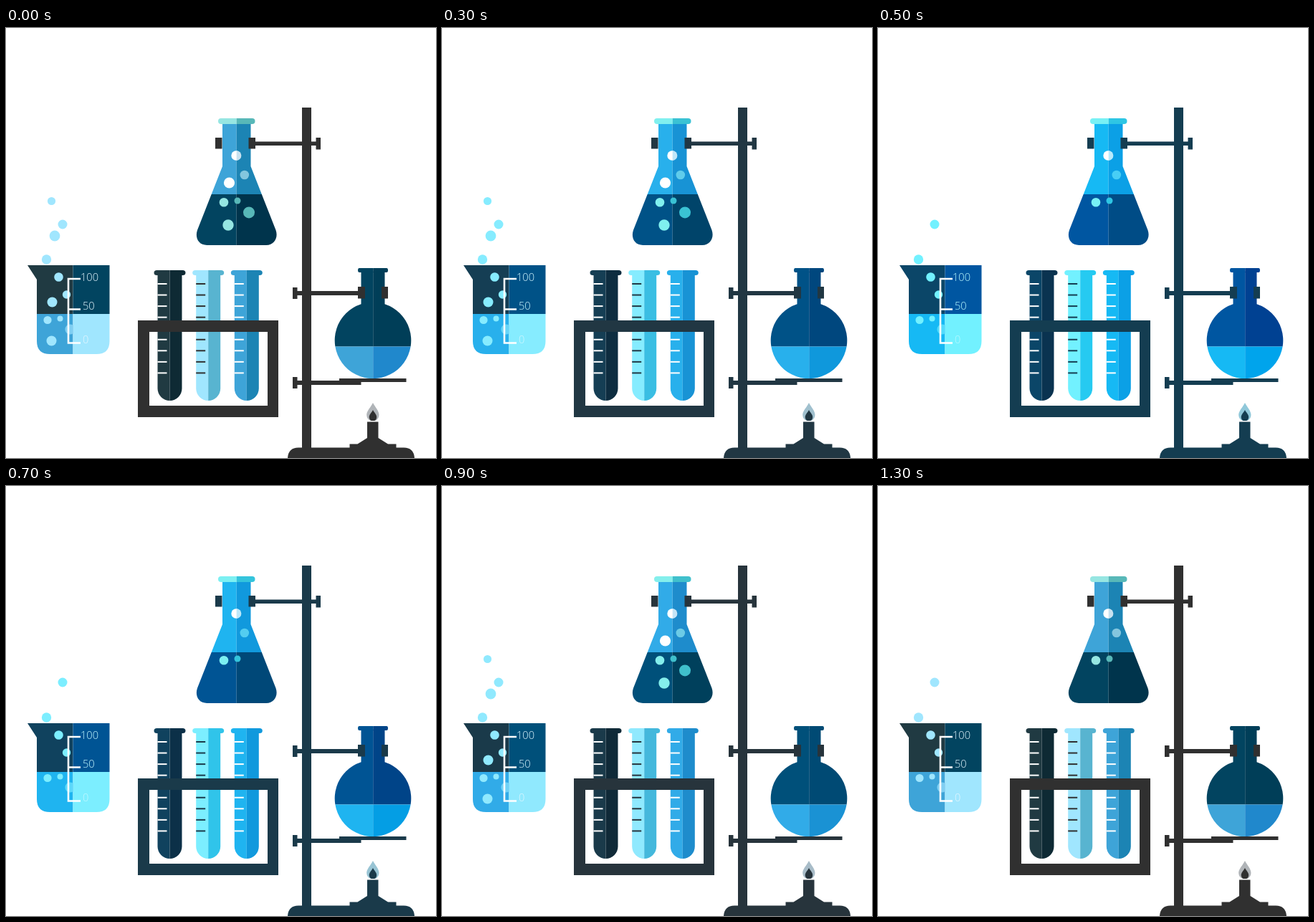
Recreate the animation shown at these times as an HTML page. Size 600x600 px, loop 1.7 s.

```html
<!DOCTYPE html>
<html lang="en">
<head>
<meta charset="utf-8">
<title>Chemistry set</title>
<style>
html, body { margin: 0; width: 100%; height: 100%; overflow: hidden; background: #fff; }
svg { display: block; width: 100vw; height: 100vh; }
text { font: 300 14.6px "Open Sans", "Noto Sans", sans-serif; }
</style>
</head>
<body>
<svg id="stage" viewBox="0 0 600 600"></svg>
<script>
// Each colour at rest, halfway and vivid
const tones = {
  iron: ['#303030', '#27343c', '#1a3a4a'],
  sky: ['#3ea4d8', '#31abe8', '#1fb4f0'],
  skyShade: ['#1c84b4', '#1e8ccc', '#1199dd'],
  azure: ['#2088cc', '#1a92d4', '#049ee4'],
  deep: ['#024460', '#00507a', '#005494'],
  deepShade: ['#00344c', '#00405c', '#004878'],
  navy: ['#003e58', '#004a74', '#004488'],
  slate: ['#203a42', '#1a3a4a', '#10425e'],
  slateShade: ['#0e2a34', '#102a38', '#0c3048'],
  ice: ['#a0e6fe', '#90e9fe', '#7ceeff'],
  iceShade: ['#58b4d0', '#44b8dc', '#30c4ea'],
  mint: ['#96e6e2', '#84efec', '#7cf0f2'],
  mintShade: ['#58b8b8', '#40c0cc', '#34c4dc'],
  haze: ['#84c6de', '#6ccbe6', '#54cdf0'],
  mist: ['#c8e2f0', '#c4e4f6', '#bce8fa'],
  drop: ['#80cff2', '#70d2f6', '#5cd8fa'],
  label: ['#e4f6fe', '#dcf6fe', '#c4f8ff'],
  flame: ['#b0b4b8', '#a8bcc8', '#98c4d4']
};

const fill = c => `style="fill:${c[0] === '#' ? c : `var(--${c})`}"`;
const rect = (x, y, x2, y2, c, r = 0) =>
  `<rect x="${x}" y="${y}" width="${x2 - x}" height="${y2 - y}" rx="${r}" ${fill(c)}/>`;
const path = (d, c) => `<path d="${d}" ${fill(c)}/>`;
const dot = (x, y, r, c, blink) =>
  `<circle cx="${x}" cy="${y}" r="${r}" ${fill(c)}${blink ? ' class="blink"' : ''}/>`;
const label = (x, y, s) => `<text x="${x}" y="${y}" ${fill('label')}>${s}</text>`;

// Vessel outline filled by bands, each split into a left and a right tone
let clips = 0;
function vessel(d, mid, bands) {
  const id = 'v' + clips++;
  const body = bands.map(([y, y2, left, right]) =>
    rect(0, y, mid, y2, left) + rect(mid, y, 600, y2, right)).join('');
  return `<clipPath id="${id}"><path d="${d}"/></clipPath><g clip-path="url(#${id})">${body}</g>`;
}

function beaker() {
  const shape = 'M30 331H144.5V437Q144.5 455 126 455H61.5Q43 455 43 437V351Z';
  return vessel(shape, 93.5, [[330, 399, 'slate', 'deep'], [399, 456, 'sky', 'ice']]) +
    dot(63.5, 241.5, 5.6, 'ice', true) +
    dot(79, 274, 6.5, 'ice') +
    dot(68, 290, 7.4, 'ice', true) +
    dot(56.5, 323, 6.7, 'ice') +
    dot(73.5, 347.5, 6.3, 'ice') +
    dot(84.5, 372, 5.7, 'ice') +
    dot(64.5, 382.5, 7, 'ice', true) +
    dot(58, 407.5, 5.6, 'ice') +
    dot(75.5, 405.5, 4, 'ice') +
    dot(63.5, 436.5, 7, 'ice', true) +
    path('M93.5 414.8A7 7 0 1 0 93.5 426.2Z', 'drop') +
    '<path d="M104 350H87V439.5H104M87 392.5H104" fill="none" stroke="#fff" stroke-width="2.6"/>' +
    label(104, 353, '100') + label(107, 393, '50') + label(107, 440, '0');
}

function tube(x, left, right, tick) {
  const shape = `M${x - 18} 338H${x + 18}Q${x + 22} 338 ${x + 22} 341.5T${x + 18} 345H${x + 17}` +
    `V503A17 17 0 0 1 ${x - 17} 503V345H${x - 18}Q${x - 22} 345 ${x - 22} 341.5T${x - 18} 338Z`;
  let marks = '';
  for (let i = 0; i < 9; i++) {
    const y = 356 + i * 15.55;
    marks += rect(x - 17, y, x - 4, y + 2, tick);
  }
  return vessel(shape, x, [[330, 530, left, right]]) + marks;
}

function rack() {
  return path('M184 408H380V543H184ZM200 424V527H365V424Z', 'iron') +
    tube(228.5, 'slate', 'slateShade', '#ffffff') +
    tube(282.2, 'ice', 'iceShade', 'iron') +
    tube(335.8, 'sky', 'skyShade', '#ffffff') +
    rect(184, 408, 380, 424, 'iron');
}

function cone() {
  const cap = 'M300 126H343.5A4 4 0 0 1 343.5 134H300A4 4 0 0 1 300 126Z';
  const body = 'M302 134H341.5V193L376.5 282C380 292 375 303 363 303H280.5C268 303 263.500 292 267 282L302 193Z';
  return vessel(body, 321.7, [[134, 232, 'sky', 'skyShade'], [232, 304, 'deep', 'deepShade']]) +
    vessel(cap, 321.7, [[125, 135, 'mint', 'mintShade']]) +
    dot(321, 178, 6.7, '#ffffff') +
    path('M321.700 171.300A6.700 6.700 0 0 1 321.700 184.700Z', 'mist') +
    dot(332.8, 205, 6.3, 'haze') +
    dot(311.5, 216, 7.6, '#ffffff', true) +
    dot(304, 243.2, 6.3, 'mint') +
    dot(323, 241, 4.5, 'mintShade') +
    dot(339, 257.4, 8, 'mintShade', true) +
    dot(310, 275, 7.7, 'mint', true);
}

function roundFlask() {
  const lip = 'M493 335H531Q533 335 533 338T531 341H493Q491 341 491 338T493 335Z';
  const body = 'M495.500 340H528.500V385.200A53.300 53.300 0 1 1 495.500 385.200Z';
  return vessel(body, 512.2, [[335, 444.5, 'deep', 'navy'], [444.5, 491, 'sky', 'azure']]) +
    vessel(lip, 512.2, [[335, 341.5, 'deep', 'navy']]);
}

function stand() {
  return rect(413, 111, 426, 590, 'iron') +
    rect(292, 153, 301.5, 168.5, 'iron') + rect(338.5, 153, 348, 168.5, 'iron') +
    rect(346, 158.5, 435, 164, 'iron') + rect(432.5, 153, 439, 169.5, 'iron') +
    rect(400, 362, 406.5, 378, 'iron') + rect(405, 367, 493, 373, 'iron') +
    rect(491, 361, 501, 377.5, 'iron') + rect(524, 361, 533, 377.5, 'iron') +
    rect(400, 487, 406.5, 503, 'iron') + rect(405, 492, 495.5, 498, 'iron') +
    rect(465, 489, 558.5, 494, 'iron') +
    path('M393 600Q394 585.500 408 585.500H555Q569 585.500 570 600Z', 'iron');
}

function burner() {
  return path('M504 549.500H519.500V572L533 580.500H544.500V586H479.500V580.500H490.500L504 572Z', 'iron') +
    path('M512 523C515 529 520.500 534 520.500 540Q520 546 515 548H509Q503.500 546 503.200 540C503.200 534 509 529 512 523Z', 'flame') +
    path('M512 533C514 537 517.200 539 517.200 543Q517 547 514 548H510Q507 547 506.700 543C506.700 539 510 537 512 533Z', 'iron');
}

const stage = document.getElementById('stage');
stage.innerHTML = beaker() + rack() + cone() + roundFlask() + stand() + burner();

const channels = hex => [1, 3, 5].map(i => parseInt(hex.slice(i, i + 2), 16));
const ramps = Object.entries(tones).map(([name, list]) => [name, list.map(channels)]);
const blinkers = stage.querySelectorAll('.blink');

// level: 0 rest, 1 halfway, 2 vivid; slightly past 2 extrapolates
function tint(level) {
  const i = level < 1 ? 0 : 1;
  for (const [name, ramp] of ramps) {
    const rgb = ramp[i].map((a, k) => {
      const v = a + (ramp[i + 1][k] - a) * (level - i);
      return Math.max(0, Math.min(255, Math.round(v)));
    });
    stage.style.setProperty('--' + name, `rgb(${rgb})`);
  }
}

const LOOP = 1700, STEP = 100;
let shown = -1;

function draw(now) {
  const step = Math.min(12, Math.floor((now % LOOP) / STEP));
  if (step !== shown) {
    shown = step;
    tint(Math.max(0, Math.min(step, 11 - step)) / 2);
    const visible = Math.floor(step / 4) % 2 === 0;
    blinkers.forEach(b => b.setAttribute('visibility', visible ? 'visible' : 'hidden'));
  }
}

const start = performance.now();
function tick() {
  draw(performance.now() - start);
  requestAnimationFrame(tick);
}
tick();
</script>
</body>
</html>
```
